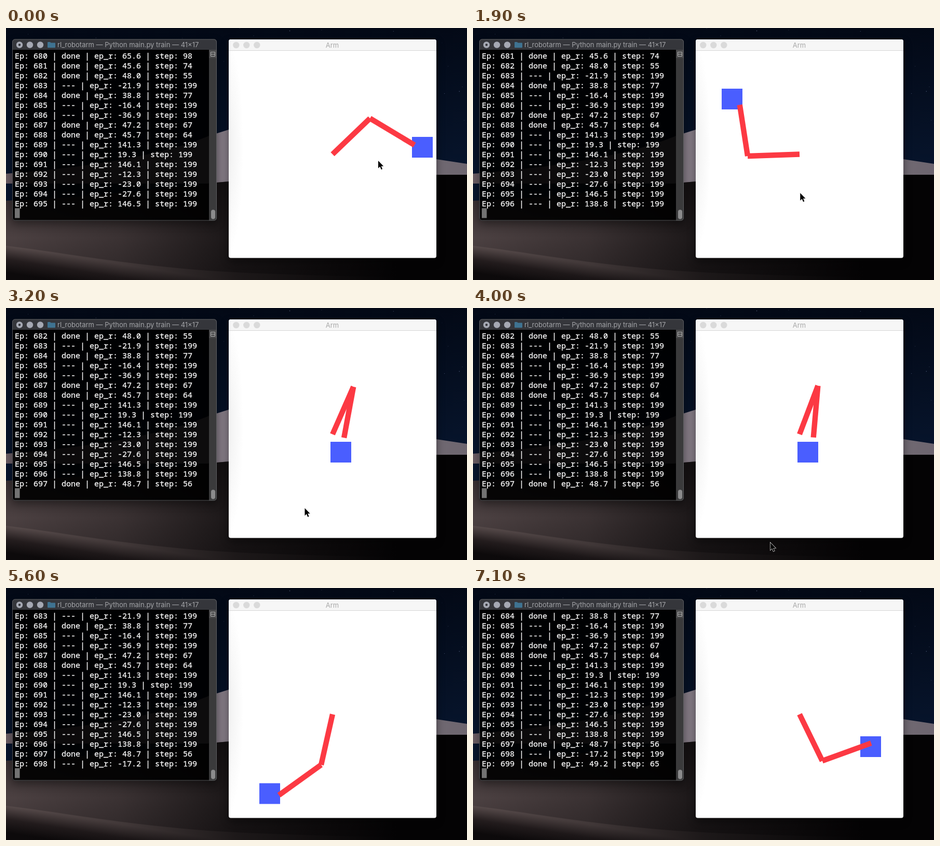
These frames come from a looping animation (888 px wide and 486 px high, 7.2 s). An HTML page:

```html
<!DOCTYPE html>
<html lang="en">
<head>
<meta charset="utf-8">
<title>Arm training</title>
<style>
  html, body { margin: 0; width: 100%; height: 100%; overflow: hidden; background: #050b1a; }
  svg { display: block; width: 888px; height: 486px; }
  .ui { font: 13px Inter, sans-serif; }
  .log { font: 15px "Noto Sans Mono", monospace; fill: #fff; stroke: #fff; stroke-width: .3px; white-space: pre; }
  .shadow { filter: drop-shadow(0 6px 8px rgba(0, 0, 0, .45)); }
</style>
</head>
<body>
<svg viewBox="0 0 888 486">
  <defs>
    <linearGradient id="sky" x2="0" y2="1">
      <stop stop-color="#030916"/><stop offset=".6" stop-color="#07152d"/>
    </linearGradient>
    <linearGradient id="far">
      <stop stop-color="#6a5d64"/><stop offset=".48" stop-color="#857c86"/><stop offset="1" stop-color="#6d666f"/>
    </linearGradient>
    <linearGradient id="near" x2="0" y2="1">
      <stop stop-color="#2b2425"/><stop offset=".6" stop-color="#4c4142"/><stop offset="1" stop-color="#3a3132"/>
    </linearGradient>
    <linearGradient id="front" gradientUnits="userSpaceOnUse" x1="0" y1="420" x2="-8" y2="470">
      <stop stop-color="#564a4a"/><stop offset=".5" stop-color="#241d1e"/><stop offset="1" stop-color="#0d0a0b"/>
    </linearGradient>
    <linearGradient id="night">
      <stop stop-color="#040304" stop-opacity="0"/><stop offset=".25" stop-color="#040304" stop-opacity=".25"/>
      <stop offset=".5" stop-color="#040304" stop-opacity=".7"/><stop offset=".85" stop-color="#040304"/>
    </linearGradient>
    <radialGradient id="dim">
      <stop stop-color="#f1f1f1"/><stop offset="1" stop-color="#fff"/>
    </radialGradient>
    <clipPath id="term"><rect x="12" y="21.5" width="394" height="350" rx="5"/></clipPath>
    <clipPath id="win"><rect x="429" y="22" width="400" height="421.5" rx="4"/></clipPath>
  </defs>

  <rect width="888" height="486" fill="url(#sky)"/>
  <g id="stars" fill="#8fa3c4"></g>
  <path fill="url(#far)" d="M0 281C140 270 290 250 391 208L429 196C520 180 700 235 829 253L888 262V300H0Z"/>
  <g id="dune">
    <path fill="url(#near)" d="M0 333C140 328 280 312 406 298C520 288 700 283 888 283V486H0Z"/>
    <path fill="url(#front)" d="M0 420C120 434 270 465 480 473S760 480 888 483V486H0Z"/>
    <path fill="url(#night)" d="M0 333C140 328 280 312 406 298C520 288 700 283 888 283V486H0Z"/>
  </g>

  <g class="shadow">
    <g clip-path="url(#term)">
      <rect x="12" y="42" width="394" height="330" fill="#000" fill-opacity=".84"/>
      <rect x="12" y="21" width="394" height="21" fill="#35363b"/>
      <rect x="391" y="42" width="15" height="330" fill="#3a3a3b"/>
      <rect x="391" y="42" width="15" height="16" fill="#4b4b4c"/>
    </g>
    <rect x="12.5" y="22" width="393" height="349" rx="5" fill="none" stroke="#68696d" stroke-opacity=".8"/>
  </g>
  <g id="termLights" fill="#a5a8b3"></g>
  <circle cx="26" cy="32.5" r="2.2" fill="#35363b"/>
  <path fill="#3f7391" d="M80 28q0-1 1-1h4l1.5 1.5H94q1 0 1 1V37q0 1-1 1H81q-1 0-1-1Z"/>
  <text class="ui" x="99" y="37" fill="#a3a4a8">rl_robotarm — Python main.py train — 41×17</text>
  <path fill="none" stroke="#b4b4b4" d="M394.5 46.5h8v8h-8ZM394.5 50.5h8"/>
  <rect x="395" y="350.5" width="8" height="18" rx="4" fill="#8b8b8c"/>
  <g id="log" class="log"></g>
  <rect x="17" y="347.5" width="9.5" height="19" fill="#737373"/>

  <g class="shadow">
    <g clip-path="url(#win)">
      <rect x="429" y="22" width="400" height="422" fill="#fff"/>
      <ellipse cx="429" cy="230" rx="28" ry="205" fill="url(#dim)"/>
      <rect x="429" y="22" width="400" height="21" fill="#f6f6f6"/>
      <rect x="429" y="43" width="400" height="1" fill="#d6d6d6"/>
    </g>
  </g>
  <g id="winLights" fill="#dadada"></g>
  <text class="ui" x="628.5" y="38" text-anchor="middle" fill="#a9a9a9">Arm</text>
  <g clip-path="url(#win)">
    <rect id="goal" width="40" height="40" fill="#4a5eff"/>
    <g stroke="#fc3943" stroke-width="10.4"><line id="upper"/><line id="lower"/></g>
  </g>
  <path id="mouse" d="M0 0V14.5L3.4 11.3L5.8 17L8.1 16L5.7 10.5H10.2Z" stroke="#fff" stroke-width="1.2" paint-order="stroke"/>
</svg>
<script>
const LOOP = 7200, STEP = 100, ROWS = 16, FIRST = 680, MAX_STEPS = 199;
const SHOULDER = [629, 243.5], LINK = 100;
const $ = id => document.getElementById(id);

// reward of each finished episode, with its step count if the goal was held
const results = ("65.6/98 45.6/74 48.0/55 -21.9 38.8/77 -16.4 -36.9 47.2/67 45.7/64 141.3 " +
  "19.3 146.1 -12.3 -23.0 -27.6 146.5 138.8 48.7/56 -17.2 49.2/65")
  .split(" ").map((entry, i) => {
    const [reward, steps] = entry.split("/");
    return `Ep: ${FIRST + i} | ${steps ? "done" : "---"} | ep_r: ${reward} | step: ${steps || MAX_STEPS}`;
  });

// each episode turns both links from one angle to another (degrees) and then holds
const episodes = [
  { at: 0, settle: 1040, goal: [782, 210], upper: [43.8, 43.8], lower: [-31, -31] },
  { at: 1040, settle: 120, goal: [479, 117], upper: [186, 182], lower: [76, 98.8] },
  { at: 1970, settle: 3320, goal: [625, 258], upper: [65.4, 82.4], lower: [251.1, 273.9], power: 3 },
  { at: 5290, settle: 250, goal: [488, 376.5], upper: [215, 257.3], lower: [270, 215.7] },
  { at: 6370, settle: 350, goal: [746, 286], upper: [-97, -64], lower: [-88, 20] }
];

const mousePath = [
  { at: 0, x: 717, y: 256 }, { at: 1100, x: 696, y: 261 }, { at: 2500, x: 581, y: 361 },
  { at: 3200, x: 575.5, y: 386 }, { at: 4500, x: 571, y: 494 }
];

const mix = (a, b, p) => a + (b - a) * p;
const progress = (t, from, length) => Math.min(1, (t - from) / length);

function set(el, attrs) {
  for (const name in attrs) el.setAttribute(name, attrs[name]);
}

function add(parent, tag, attrs) {
  const el = document.createElementNS("http://www.w3.org/2000/svg", tag);
  set(el, attrs);
  return parent.appendChild(el);
}

function drawLink(el, [x1, y1], deg) {
  const a = deg * Math.PI / 180;
  const x2 = x1 + LINK * Math.cos(a), y2 = y1 - LINK * Math.sin(a);
  set(el, { x1, y1, x2, y2 });
  return [x2, y2];
}

function drawMouse(t) {
  const i = Math.max(1, mousePath.findIndex(k => k.at > t));
  const last = mousePath.length - 1;
  const b = t < mousePath[last].at ? mousePath[i] : mousePath[last];
  const a = mousePath[mousePath.indexOf(b) - 1];
  const p = progress(t, a.at, b.at - a.at);
  set($("mouse"), { transform: `translate(${mix(a.x, b.x, p)} ${mix(a.y, b.y, p)})` });
}

let seed = 11;
const random = () => (seed = seed * 16807 % 2147483647) / 2147483647;
for (let i = 0; i < 90; i++) {
  add($("stars"), "circle", { cx: random() * 888, cy: random() * 230, r: 0.3 + random() * 0.4, opacity: 0.2 + random() * 0.5 });
}
for (let i = 0; i < 3; i++) {
  add($("termLights"), "circle", { cx: 26 + i * 20, cy: 32.5, r: 6.2 });
  add($("winLights"), "circle", { cx: 443.3 + i * 20, cy: 33, r: 6.2 });
}
const lines = Array.from({ length: ROWS }, (_, i) => add($("log"), "text", { x: 17, y: 59 + i * 18.97 }));
let shown = -1;

function draw(t) {
  const n = episodes.filter(e => e.at <= t).length - 1;
  const { at, settle, goal, upper, lower, power = 1 } = episodes[n];
  if (n !== shown) {
    lines.forEach((line, i) => line.textContent = results[n + i]);
    set($("goal"), { x: goal[0], y: goal[1] });
    shown = n;
  }
  const p = progress(t, at, settle);
  const elbow = drawLink($("upper"), SHOULDER, mix(...upper, p ** power));
  drawLink($("lower"), elbow, mix(...lower, p));
  drawMouse(t);
}

const start = performance.now();
function tick() {
  const t = (performance.now() - start) % LOOP;
  draw(Math.floor(t / STEP) * STEP);
  requestAnimationFrame(tick);
}
tick();
</script>
</body>
</html>
```
